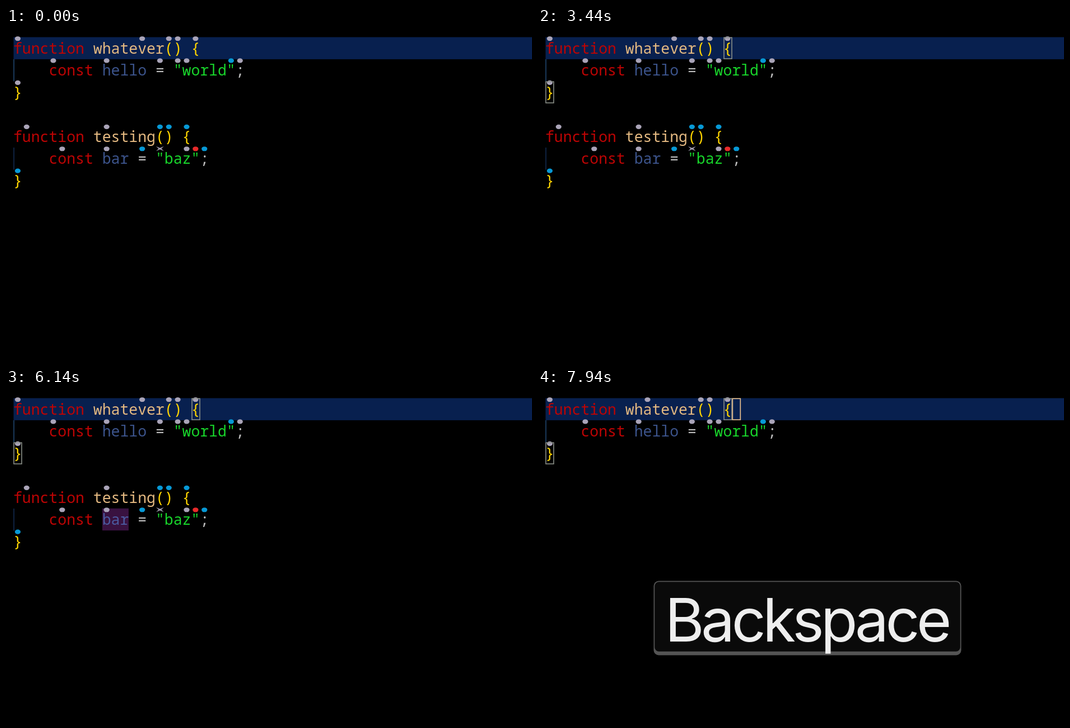
Recreate the animation shown at these times as an HTML page. Size 939 by 596 pixels, loop 8 s.

```html
<!DOCTYPE html>
<html lang="en">
<head>
<meta charset="utf-8">
<title>Editing code by keyboard</title>
<style>
  html, body { margin: 0; width: 100%; height: 100%; overflow: hidden; background: #000; }
  svg { display: block; width: 939px; height: 596px; }
  .code { font: 26.45px "Noto Sans Mono", "DejaVu Sans Mono", monospace; }
  .kw { fill: #bd0404; }
  .fn { fill: #e4b981; }
  .id { fill: #3c548c; }
  .id.lit { fill: #4b5a9f; }
  .br { fill: #ffd500; font-weight: 500; }
  .st { fill: #18d52b; }
  .op { fill: #bcbcbc; }
  .grey { fill: #aaa4b8; }
  .blue { fill: #0799d6; }
  .red { fill: #e72a2a; }
  .sel { fill: #391240; }
  .match { fill: none; stroke: #8a8f88; stroke-width: 1.6; }
  .key text {
    font: 107.5px Inter, "Liberation Sans", sans-serif;
    font-optical-sizing: none;
    letter-spacing: -.055em;
    text-anchor: middle;
    fill: #eee;
  }
</style>
</head>
<body>
<svg id="stage" viewBox="0 0 939 596"></svg>
<script>
const LOOP = 8000, LEFT = 13, TOP = 16.3, COL = 15.87, ROW = 39.45;
const stage = document.getElementById("stage");
const timed = [];

const colX = c => LEFT + c * COL;
const rowY = r => TOP + r * ROW;

function add(name, attrs, parent = stage) {
  const el = document.createElementNS("http://www.w3.org/2000/svg", name);
  for (const k in attrs) el.setAttribute(k, attrs[k]);
  return parent.appendChild(el);
}

// Show an element only during the given [from, to] spans
function during(el, ...spans) {
  timed.push({ el, spans });
  return el;
}

const layer = () => add("g", {});

function rect(x, y, width, height, attrs, parent) {
  return add("rect", { x, y, width, height, ...attrs }, parent);
}

function code(row, col, cls, text, parent) {
  const el = add("text", { class: "code " + cls, x: colX(col), y: rowY(row) + 29.7 }, parent);
  el.textContent = text;
  return el;
}

function hats(row, cls, cols, parent) {
  for (const c of cols)
    add("ellipse", { class: cls, cx: colX(c + .5), cy: rowY(row) + 2.7, rx: 5.1, ry: 4.1 }, parent);
}

function select(row, from, to, parent) {
  rect(colX(from) + .2, rowY(row) + .2, (to - from) * COL - .6, ROW, { class: "sel" }, parent);
}

function keycap(x, width, label, parent) {
  const g = add("g", { class: "key" }, parent);
  rect(x, 343.5, width, 133, { rx: 9, fill: "#545454" }, g);
  rect(x + 1.8, 345.3, width - 3.6, 124.5, { rx: 7.5, fill: "#0a0a0a" }, g);
  add("text", { x: x + width / 2 - 1.5, y: 452 }, g).textContent = label;
}

// Keys come in slightly dim, then reach full strength
function press(from, full, to, caps) {
  const g = during(layer(), [from, to]);
  for (const cap of caps) keycap(...cap, g);
  timed.push({ el: g, dimUntil: full });
}

// Current line
rect(13.5, 16.4, 926, 39.5, { fill: "#08204f" });

// Selections
const word = during(layer(), [4640, 6440]);
select(5, 10, 13, word);
const block = during(layer(), [6440, 7940]);
select(4, 0, 20, block);
select(5, 0, 22, block);
select(6, 0, 1, block);

// First function
rect(13.3, 55.9, 1.6, 39.5, { fill: "#20466e" });
code(0, 0, "kw", "function");
code(0, 9, "fn", "whatever");
code(0, 17, "br", "()");
code(0, 20, "br", "{");
code(1, 4, "kw", "const");
code(1, 10, "id", "hello");
code(1, 16, "op", "=");
code(1, 18, "st", '"world"');
code(1, 25, "op", ";");
code(2, 0, "br", "}");
hats(0, "grey", [0, 17, 18, 20]);
hats(0, "grey", [14], during(layer(), [0, 7940]));
hats(0, "grey", [11], during(layer(), [7940, LOOP]));
hats(1, "grey", [4, 10, 16, 18, 19, 25]);
hats(1, "blue", [24]);
hats(2, "grey", [0]);

// Second function, deleted at the end
const second = during(layer(), [0, 7940]);
rect(13.3, 214, 1.6, 39.5, { fill: "#122b50" }, second);
code(4, 0, "kw", "function", second);
code(4, 9, "fn", "testing", second);
code(4, 16, "br", "()", second);
code(4, 19, "br", "{", second);
code(5, 4, "kw", "const", second);
during(code(5, 10, "id", "bar", second), [0, 4640]);
during(code(5, 10, "id lit", "bar", second), [4640, 7940]);
code(5, 14, "op", "=", second);
code(5, 16, "st", '"baz"', second);
code(5, 21, "op", ";", second);
code(6, 0, "br", "}", second);
hats(4, "grey", [1, 10], second);
hats(4, "blue", [16, 17, 19], second);
hats(5, "grey", [5, 10, 19], second);
hats(5, "blue", [14, 21], second);
hats(5, "red", [20], second);
hats(6, "blue", [0], second);
add("path", {
  class: "grey",
  d: "M-7-4.2L0-1.3 7-4.2 2.4 0 7 4.2 0 1.3-7 4.2-2.4 0Z",
  transform: `translate(${colX(16.5)} 216)`
}, second);

// Matching brackets
const match = during(layer(), [300, LOOP]);
rect(332, 17.2, 14, 37.8, { class: "match" }, match);
rect(14, 96.2, 14, 37.8, { class: "match" }, match);

// Cursor: blinking bar, then blinking outline
during(rect(347, 16.5, 3, 39, { fill: "#e6bd8c" }), [150, 750], [1200, 1640], [2240, 2690]);
during(rect(347.3, 17.2, 14, 37.8, { fill: "none", stroke: "#e6bd8c", "stroke-width": 1.7 }),
  [2690, 3140], [3590, 4190], [4640, 5090], [5690, 6140], [6590, 7040], [7640, LOOP]);

// Pressed keys
press(2690, 2840, 3440, [[376, 210, "Esc"]]);
press(4490, 4640, 4640, [[417, 128, "M"]]);
press(4640, 4790, 5390, [[359.5, 128, "M"], [499.5, 103, "B"]]);
press(6440, 6590, 7190, [[434, 94, "F"]]);
press(7790, 7940, LOOP, [[206.5, 549, "Backspace"]]);

function draw(now) {
  const t = now % LOOP;
  for (const { el, spans, dimUntil } of timed) {
    if (spans) el.style.display = spans.some(([a, b]) => t >= a && t < b) ? "" : "none";
    else el.style.opacity = t < dimUntil ? .88 : 1;
  }
}

const start = performance.now();
function tick() {
  draw(performance.now() - start);
  requestAnimationFrame(tick);
}
tick();
</script>
</body>
</html>
```
